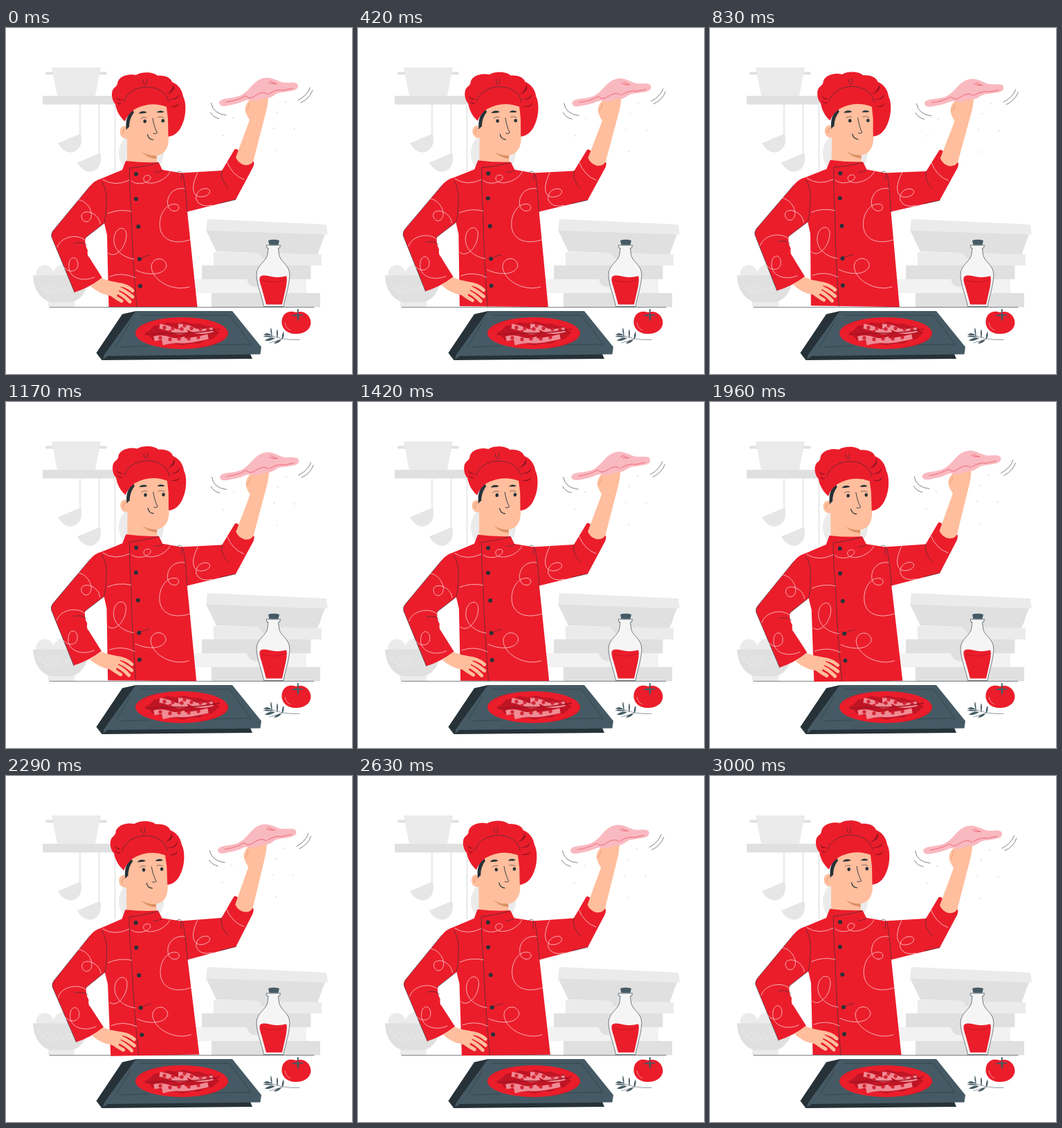
These frames come from a looping animation (500x500 px, 3040 ms). An HTML page:

```html
<!DOCTYPE html>
<html lang="en">
<head>
<meta charset="utf-8">
<title>Chef tossing dough</title>
<style>
html, body { margin: 0; width: 100%; height: 100%; overflow: hidden; background: #fff }
svg { display: block; width: 100%; height: 100% }
.red { fill: #eb1d2b }
.skin { fill: #ffbe9d }
.ink { fill: #263238 }
.slate { fill: #455a64 }
.g1 { fill: #ebebeb }
.g2 { fill: #e0e0e0 }
.line { fill: none; stroke: #263238; stroke-width: .6; stroke-linecap: round; stroke-linejoin: round }
.swirl { fill: none; stroke: #fbd3d6; stroke-width: .8; stroke-linecap: round }
.fingers { fill: none; stroke: #ffbe9d; stroke-width: 5; stroke-linecap: round }
</style>
</head>
<body>
<svg viewBox="0 0 500 500">
  <!-- shelf and utensils -->
  <path class="g1" d="M66 57H137L129 98H74Z"/>
  <rect class="g2" x="57" y="63.5" width="89" height="4" rx="2"/>
  <path class="g1" d="M67.500 63.500H135.500L134.500 68H68.500Z"/>
  <path class="g2" d="M53 98H190V110.500H53Z"/>
  <path class="g1" d="M105.800 110.500H108.300V156H105.800ZM133.200 110.500H135.700V185H133.200ZM156.300 110.500H158.700V207H156.300Z"/>
  <path id="ladle" fill="#e6e6e6" d="M75 166.500L108 152.500C111 164 108 175 98 179C89 182 79 175 75 166.500Z"/>
  <use href="#ladle" x="28" y="28"/>
  <circle class="g1" cx="195.500" cy="181" r="32.500"/>

  <!-- bowl -->
  <g class="g1">
    <circle cx="56" cy="355" r="12.500"/><circle cx="84" cy="357" r="16"/><circle cx="106" cy="358" r="12"/>
  </g>
  <path class="g2" d="M39 357.500H120C119 378 110 391 97 396H63C49 391 40 378 39 357.500Z"/>
  <path class="g1" d="M61 396H99V403H61Z"/>
  <path d="M47 365C52 383 66 383 63 373C60 367 52 374 57 380C63 386 72 380 77 376C81 370 73 364 69 371C65 378 75 385 83 379C91 368 99 374 93 379C88 383 84 374 92 373" fill="none" stroke="#ebebeb" stroke-width=".8"/>

  <!-- stacked boxes -->
  <path class="g2" d="M289 292L461 298L450 328L304 323Z"/>
  <path class="g1" d="M291 276L463 284L465 298.500L289 292.500Z"/>
  <path class="g1" d="M300 323.500L456 327V343H300Z"/>
  <path class="g2" d="M366 325L394 326C393 339 368 338 366 325Z"/>
  <path class="g2" d="M283 343H440.500V363H283Z"/>
  <path d="M268 363H434V383H268Z" fill="#f2f2f2"/>
  <path class="g2" d="M348 362H374C372 379 349 378 348 362Z"/>
  <path class="g2" d="M297 383H454V403.500H297Z"/>

  <path class="line" d="M63 403.500H445"/>

  <!-- bottle -->
  <path class="line" style="fill:#f5f5f5" d="M376.500 314H396.500L395.500 318H393.500L394.500 327C396 338 410 342 410 357C409 375 403 390 401 402.500H372.500C370 388 363 374 362 357C362 342 376 338 378 327L379 318H377.500Z"/>
  <path class="red" d="M366.500 361Q368 356 378 358Q390 362 405 358.500Q407 362 404.500 375L399 399.500H376L369 374Q366 366 366.500 361Z"/>
  <path d="M369 364Q388 371 404 363" fill="none" stroke="#b51222" stroke-width=".7"/>
  <path class="slate" d="M379 307Q387 304.500 395 307L393.500 313.500H380.500Z"/>

  <!-- tomato -->
  <path class="red" d="M419 411C431 407 441 416 440.500 427C439 437 430 442.500 418 442C406 442 398 434 398.500 424C399 412 409 407 419 411Z"/>
  <path class="slate" d="M420.800 406.500L422.800 406L422.500 414Q427 413 431 415.500Q427 416 423.500 415.500Q424 420 422 424Q420 420 420.500 415.500Q416 417 412 416Q416 413.500 421 413.500Z"/>
  <path d="M403 426Q404 434 411 437" fill="none" stroke="#ffd9dc" stroke-width=".6"/>

  <!-- herb -->
  <path class="line" style="stroke:#455a64" d="M376 441Q398 452 424 450.500M384 445L383 434M392 448L392 437M399 450L401 440M386 446L374 445M398 450L381 455"/>
  <path class="slate" d="M372 443Q378 439 384 444Q377 445 372 443ZM382.500 433Q385.500 439 384 445Q381.500 439 382.500 433ZM392 435Q394 441 392 448Q390 441 392 435ZM401 439Q403 445 399 450Q398 444 401 439ZM371 445.500Q379 443.500 386 446.500Q378 447.500 371 445.500ZM387 456Q392 450 398 450.500Q394 456 387 456ZM374 452Q380 446 389 448Q383 453 374 452Z"/>

  <!-- tray -->
  <path class="ink" d="M168 413.500L188 409L330 440L353 471L356 478L138.500 480L130.500 469.500Z"/>
  <path class="slate" d="M188 409H327L369 461L367.500 471.500L147 474L140 479L142 472L184 414Z"/>
  <path class="line" style="stroke-width:.5" d="M180 425L159 460M194 415H323L354 457L296 458M165 461L206 459.500"/>

  <!-- pizza -->
  <ellipse class="red" cx="254" cy="441" rx="67" ry="23"/>
  <path fill="#c01525" d="M200 441Q209 437 214 430Q226 430 233 425Q247 429 257 424Q270 429 279 427Q288 432 298 431Q301 436 309 440Q303 445 298 450Q286 450 280 456Q266 454 256 459Q242 455 231 457Q222 451 212 451Q209 445 200 441Z"/>
  <g fill="none" stroke="#f08b94" stroke-width="7">
    <path d="M222 431Q234 433 242 437T262 437M249 431Q262 431 270 436T299 436"/>
    <path d="M214 449Q227 446 236 450T259 449M226 455Q242 451 252 452T292 446"/>
  </g>
  <g id="toppings" fill="#dc2535" stroke="#b31726" stroke-width=".5"></g>
  <path d="M201 443Q230 440 256 441Q285 440 309 435" fill="none" stroke="#a01421" stroke-width="1.500"/>
  <path d="M193 435Q203 424 222 421M315 449Q302 459 278 462" fill="none" stroke="#b31726" stroke-width=".6"/>

  <g id="chef">
    <!-- neck, face and ear -->
    <path class="skin" d="M175 146H218V196Q196 204 175 194Z"/>
    <path fill="#dc9164" d="M195 177Q204 184 217.500 184V189Q203 188 195 177Z"/>
    <path class="skin" d="M177 143C162 137 162 156 170 159Q174 161 178 158Z"/>
    <path class="line" style="stroke:#c9794d" d="M174 146Q168 145 169 153"/>
    <path class="skin" d="M177 125L186 104H232Q235 135 235 162C234 177 226 185 214 184.500Q202 184 194 177L177 166Z"/>
    <path class="ink" d="M174 147Q171 129 183 118L185 122Q178 131 178 143Q176 144 174 147Z"/>
    <path class="ink" d="M191.500 123.500Q196 118 203.500 121.500Q203 123.500 191.500 123.500ZM217.500 122Q222 117.500 228.500 121Q228 123 217.500 122Z"/>
    <ellipse class="ink" cx="200.700" cy="134.800" rx="2.300" ry="2.600"/>
    <ellipse class="ink" cx="226.800" cy="134" rx="2.300" ry="2.600"/>
    <path class="line" d="M195 131Q198 128 203 129.500M219.500 129Q223 127 228 129.500"/>
    <path class="line" style="stroke-width:.9" d="M212 130.500Q214 143 218.500 151.500Q216 154 213 152.500"/>
    <path class="line" style="stroke-width:1.200" d="M204.500 154Q206 161 212.500 161.500"/>

    <!-- hat -->
    <path class="red" d="M172 135C165 129 160 121 158 110C152 104 151 90 157 86Q160 84 161 81C161 70 177 65 188 68C198 62 214 64 219 69C230 68 238 72 240 78C250 82 255 91 256 99C261 108 260 126 256 136C252 148 245 156 234.500 157L234 131L232 114Q208 105 185 118Q175 126 172 135Z"/>
    <path class="line" d="M170 107C178 78 230 78 235 107M198 75Q198 81 201 82M203 74Q204 80 202 82"/>
    <path d="M231 96Q240 92 242 82Q246 92 231 96ZM234 103Q246 104 250 95Q249 106 234 103ZM236 113Q247 114 251 108Q248 117 236 113ZM169 103Q163 104 159 99Q162 107 169 103ZM169 109Q163 110 160 106Q163 113 169 109Z" fill="#8f1420"/>

    <!-- jacket -->
    <path class="red" d="M173 192Q197 195 220.500 194L226 205L253 209.500L312 206L330 176Q332 173 336 177Q344 190 358 193Q359 196 357 201L332 248L262 265.500L276.500 403H148.500L146 299L142 282L115 303Q113 312 118 321Q117 329 120 331L139 361Q121 375 99 382L66 302Q65 297 68 293L121 229Q128 220 138 217.500L168 205Z"/>
    <path class="line" d="M121 229L68 293Q65 297 66 302L99 382M332 248L310 253M312 206Q309 219 321 231M139 222Q147 236 145 257Q145 271 142 282L114 304M179 202.500Q197 201 219 195M178.500 203Q178 227 181 267Q183 338 189 403M256 211Q258 224 260 241L262 265M214 209Q223 208 226 206M193 334Q201 329 208 328.500M99 311Q111 308 117 314M247 209Q251 205 254 209L253 220"/>
    <path class="swirl" d="M140 219Q157 230 178 220M181 221C190 229 209 223 209 216C208 211 198 212 199 219C202 229 229 224 237 208
      M104 248C122 250 130 276 117 280C109 281 105 267 115 266C123 264 136 273 136 283
      M74 317C78 302 103 296 115 307
      M84 346C91 355 104 352 104 342C104 329 92 329 91 341C88 361 111 368 128 360
      M147 268Q163 261 181 265
      M148 325C156 334 174 319 174 298C173 286 161 287 157 299C152 316 165 331 185 334
      M150 359Q168 352 187 361
      M188 350C204 358 228 358 232 344C231 330 211 330 210 345C211 364 240 382 265 374
      M258 232C237 229 229 250 236 261C245 270 255 260 247 255C231 251 219 272 223 291C228 310 249 312 266 306
      M277 209C267 229 269 243 281 244C294 244 299 234 290 232C281 231 273 239 275 248Q280 260 298 256
      M319 193Q327 213 344 219"/>
    <g id="buttons" class="ink"></g>

    <!-- raised forearm and hand -->
    <path class="skin" d="M332 187L352 133Q344 121 346 114Q349 105 356 101L379 98Q379 110 375 124L357.500 192Q354 199 345 198Q336 196 332 187Z"/>
    <path class="line" style="stroke:#d8895f" d="M347 119Q351 117 352 109"/>

    <!-- dough -->
    <path fill="#f9b9c0" d="M308 108C310 100 325 103 338 98C352 92 356 77 371 72.500C384 69 391 77 402 79C413 79 422 77 422 84C422 91 411 91 399 93C389 93 386 101 378 101C368 101 362 107 355 105C347 102 344 107 331 110C322 111 310 117 308 108Z"/>
    <path fill="none" stroke="#e9475a" stroke-width=".7" d="M318 107Q334 105 346 98Q352 104 360 98Q371 90 379 96M380 95Q391 88 401 90Q410 88 415 87M379 78Q385 82 390 80M382 76Q386 80 392 81"/>
    <path class="line" d="M296.500 108.500Q299 124 318 126M295.500 122Q299 129 308 131M439.500 86Q436 97 422 104.500M443 90Q439 102 426 108"/>
    <g id="flour" fill="#d6d6d6"></g>

    <!-- hand on hip -->
    <path class="skin" d="M122 373L138 361.500Q149 366 160 367.500L166 373L160 388L151 387Q136 385 122 373Z"/>
    <path class="fingers" d="M159 370Q174 371 183 379.500M158 374Q172 379 183 388.500M156 380Q168 384 179 395.500M151 384Q159 390 167 394.500"/>
  </g>
</svg>
<script>
const byId = id => document.getElementById(id);
const dots = (id, r, points) => byId(id).innerHTML =
  points.map(([x, y]) => `<circle cx="${x}" cy="${y}" r="${r}"/>`).join('');

dots('buttons', 3, [[188, 211], [188, 247], [191.3, 287], [193, 334], [194, 373]]);
dots('flour', .9, [[328, 130], [313.5, 155], [386.5, 145], [391, 177], [416.5, 146], [404, 107], [392, 122]]);
dots('toppings', 2.4, [[229, 433], [241, 434], [254, 435], [268, 434], [281, 435], [292, 436],
  [223, 448], [237, 450], [250, 449], [264, 449], [278, 447], [237, 439], [258, 430]]);

// Linear sway: 0 to 1 degree, across to -1, then back, with a short rest.
function sway(ms) {
  const t = Math.min(ms % 3040, 3000) / 750;
  return t < 1 ? t : t < 3 ? 2 - t : t - 4;
}

const start = performance.now();
function draw() {
  byId('chef').setAttribute('transform', `rotate(${sway(performance.now() - start)} 255 234)`);
  requestAnimationFrame(draw);
}
draw();
</script>
</body>
</html>
```
